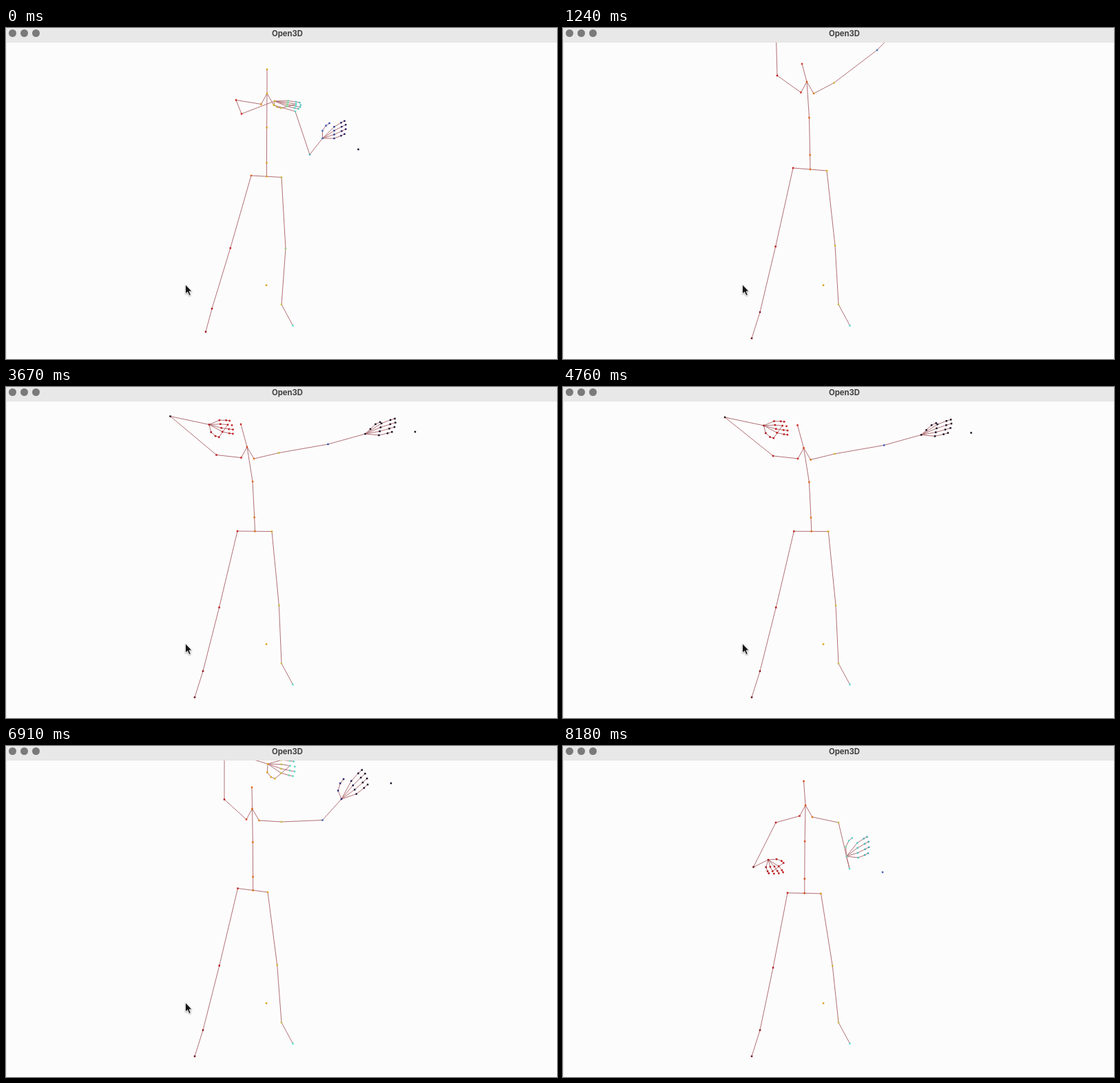
An HTML page with a canvas for the animation above (8210 ms loop, 800 px wide and 480 px high).

```html
<!DOCTYPE html>
<html lang="en">
<head>
<meta charset="utf-8">
<title>Open3D</title>
<style>
html, body { margin: 0; width: 100%; height: 100%; overflow: hidden; background: #fdfcfd; }
canvas { position: absolute; left: 0; top: 0; }
header { position: absolute; left: 0; top: 0; width: 800px; height: 20px; background: #e9e8e9; border-bottom: 1px solid #e4e3e4; }
header i { position: absolute; top: 2.3px; width: 11px; height: 11px; border-radius: 50%; background: #7b7a7b; }
header b { position: absolute; left: 308.5px; width: 200px; top: 0; text-align: center; font: 700 11.3px/16px Inter, sans-serif; color: #414041; }
svg { position: absolute; left: 256px; top: 368px; }
</style>
</head>
<body>
<canvas width="800" height="480"></canvas>
<header><i style="left:4px"></i><i style="left:21px"></i><i style="left:38px"></i><b>Open3D</b></header>
<svg width="20" height="26"><path d="M4.5 4V17.5L7.6 14.8 10 20 12.3 19 10 13.9H14Z" fill="#161416" stroke="#fff" stroke-width=".8" style="filter:drop-shadow(0 1px 1px #0005)"/></svg>
<script>
const LOOP = 8210, CURSOR_GONE = 7300;

// Key points of each pose; the other joints follow from them.
// palm: vector along the fingers, vector across them, fold of the thumb
const crossed = {
  head: [379, 60], neck: [379, 95], hipR: [356, 214], hipL: [400, 216.5], step: [1],
  shoulderR: [334, 104.5], elbowR: [342, 124.5], wristR: [390, 106], palmR: [1.11, .21, .1, -.48, 0],
  shoulderL: [420, 121], elbowL: [441, 183.5], wristL: [459.5, 160], palmL: [1, -.49, 0, 1, 0], dot: [52, 16]
};
const reach = {
  head: [357, 60], neck: [357.5, 91], hipR: [336.5, 206.5], hipL: [380, 212], step: [0],
  shoulderR: [317, 77.5], elbowR: [317, 7], wristR: [380, 26], palmR: [1.16, .22, .06, -1.12, 0],
  shoulderL: [400, 110], elbowL: [459.5, 107.5], wristL: [487, 77], palmL: [1.06, -.99, .44, 1.12, 0], dot: [72, -23]
};
const raised = {
  ...reach, head: [347, 52], neck: [354, 78], hipR: [334, 203], hipL: [383, 207],
  shoulderR: [311, 69], elbowR: [309, -5], wristR: [345, -40],
  shoulderL: [393.5, 79.5], elbowL: [456, 32], wristL: [495, -8]
};
const wide = {
  head: [341, 54], neck: [350, 87], hipR: [336, 209], hipL: [386, 209.5], step: [0],
  shoulderR: [305.5, 98.5], elbowR: [238.5, 42.5], wristR: [295, 54.5], palmR: [1, .12, -.25, -1, 0],
  shoulderL: [396, 95.5], elbowL: [467.5, 83], wristL: [521.5, 68], palmL: [1.28, -.39, -.22, 1.02, 1], dot: [72.5, -3]
};
const wideHigh = {
  ...wide, neck: [349, 85], shoulderR: [304.5, 95], elbowR: [234, 42.5], wristR: [290, 45], palmR: [1.06, -.16, -.25, -1, 0],
  shoulderL: [395, 92.5], elbowL: [465, 71], wristL: [517.5, 47.5], palmL: [1.22, -.49, -.1, 1.12, 1], dot: [71.5, -10]
};
const wideLow = { ...wide, hipR: [334.5, 209.5], hipL: [384.5, 209.5] };
for (const n of ['head', 'neck', 'shoulderR', 'elbowR', 'wristR', 'shoulderL', 'elbowL', 'wristL'])
  wideLow[n] = [wide[n][0] - (n.endsWith('L') ? 3 : 1), wide[n][1] + 3];
const low = {
  head: [349.5, 51], neck: [352, 86], hipR: [326, 213], hipL: [374.5, 214], step: [0],
  shoulderR: [309, 111], elbowR: [276.5, 175.5], wristR: [298, 165], palmR: [.35, .59, -1.1, .08, 0],
  shoulderL: [400, 111], elbowL: [416, 178], wristL: [411.5, 160], palmL: [.96, -.51, .08, 1.26, 0], dot: [52.5, 23]
};
const MOVES = [
  { from: crossed, to: raised, start: 0, end: 950 },
  { from: raised, to: wideHigh, start: 1380, end: 2020 },
  { from: wideHigh, to: wide, start: 2360, end: 3400 },
  { from: wide, to: wideLow, start: 3670, end: 5940 },
  { from: wideLow, to: reach, start: 6250, end: 6870 },
  { from: reach, to: low, start: 6930, end: 7620 }
];
const CHAINS = ['head neck chest belly pelvis', 'pelvis hipR kneeR ankleR toeR', 'pelvis hipL kneeL ankleL toeL',
  'neck collarR shoulderR elbowR wristR', 'neck collarL shoulderL elbowL wristL'].map(s => s.split(' '));

const g = document.querySelector('canvas').getContext('2d');
const cursor = document.querySelector('svg');

// Points are coloured by how far across the scene they lie
const ramp = g.createLinearGradient(240, 0, 520, 0);
const STOPS = {
  240: '#2a1418', 275: '#6a1418', 300: '#b81a20', 342: '#cc2a24', 359: '#e0701a', 382: '#dcac24',
  400: '#c8c044', 414: '#5fe0d0', 440: '#4fb0b0', 465: '#3f60b8', 487: '#2c2470', 518: '#1c1024'
};
for (const x in STOPS) ramp.addColorStop((x - 240) / 280, STOPS[x]);

const mix = (a, b, u) => a.map((v, i) => v + (b[i] - v) * u);
const add = ([x, y], dx, dy) => [x + dx, y + dy];

function line(points) {
  g.beginPath();
  for (const p of points) g.lineTo(...p);
  g.stroke();
}

const point = ([x, y]) => g.fillRect(x - 1.25, y - 1.25, 2.5, 2.5);

// Thumb, then four fingers fanned out from the wrist
function hand([wx, wy], [ax, ay, bx, by, fold]) {
  const place = ([x, y]) => [wx + ax * x + bx * y, wy + ay * x + by * y];
  const thumb = [[0, -11], [5, -16], [10, -17]].map(p => add(p, 5 * fold, 6 * fold));
  const fingers = [0, 1, 2, 3].map(i => [17, 27, 32].map((x, j) =>
    [x + j * Math.sin(i * Math.PI / 3), (i - 1.5) * (j ? 6.3 : 5.6)]));
  return [thumb, ...fingers].map(f => f.map(place));
}

function drawHand(wrist, chains, loose) {
  chains.forEach((f, i) => line([wrist, ...(i === loose ? f.slice(0, 2) : f)]));
  // The thumb is tied to the finger whose tip stays loose
  if (loose) line([chains[0][2], chains[loose][1]]);
  chains.flat().forEach(point);
}

function bodyAt(t) {
  const { from, to, start, end } = MOVES.findLast(m => t >= m.start);
  const s = Math.min(1, (t - start) / (end - start));
  const u = s * s * (3 - 2 * s);
  const J = {};
  for (const n in from) J[n] = mix(from[n], to[n], u);

  // The right forearm swings outward when it goes up or down
  const swing = Math.min(40, Math.abs(to.elbowR[1] - from.elbowR[1])) * Math.sin(Math.PI * u);
  J.elbowR[0] -= swing;
  J.wristR[0] -= swing;

  const { step: [step], palmR, palmL, ...joints } = J;
  J.pelvis = joints.pelvis = mix(J.hipR, J.hipL, .51);
  const spine = (x, y) => [mix(J.neck, J.pelvis, x)[0], mix(J.neck, J.pelvis, y)[1]];
  const ankleR = [286 + 13 * step, 412 - 5 * step], ankleL = [400, 401];
  Object.assign(joints, {
    chest: spine(.7, .41), belly: spine(.93, .835),
    collarR: add(J.neck, -8.5, 15.5), collarL: add(J.neck, 10, 17),
    ankleR, ankleL, toeR: [274 + 16 * step, 450 - 9.5 * step], toeL: [416.5, 431.5],
    kneeR: add(mix(J.hipR, ankleR, .545), .8, 0), kneeL: add(mix(J.hipL, ankleL, .56), 2.5 + 3.5 * step, 0),
    dot: add(J.wristL, ...J.dot)
  });
  return { joints, palmR, palmL };
}

function draw(t) {
  const { joints, palmR, palmL } = bodyAt(t);
  g.fillStyle = '#fdfcfd';
  g.fillRect(0, 0, 800, 480);
  g.fillStyle = '#e8e7e8';
  g.fillRect(0, 0, 1, 480);
  g.strokeStyle = '#b07074';
  g.fillStyle = ramp;
  for (const c of CHAINS) line(c.map(n => joints[n]));
  drawHand(joints.wristR, hand(joints.wristR, palmR), 3);
  drawHand(joints.wristL, hand(joints.wristL, palmL));
  Object.values(joints).forEach(point);
  point([378, 373]);
  cursor.style.display = t < CURSOR_GONE ? '' : 'none';
}

const start = performance.now();
function tick() {
  draw(Math.max(0, performance.now() - start) % LOOP);
  requestAnimationFrame(tick);
}
tick();
</script>
</body>
</html>
```
